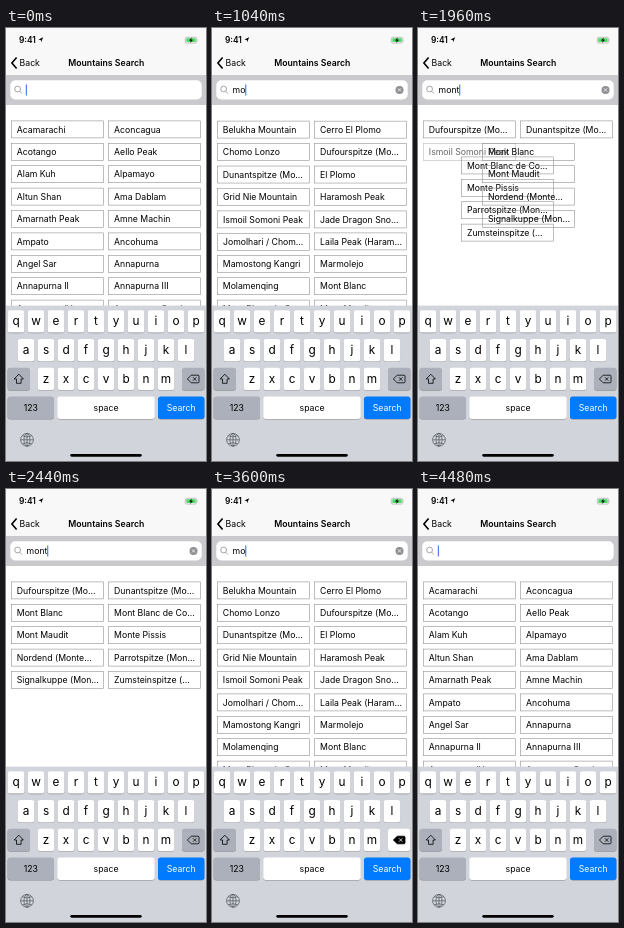
Write an HTML page that moves like this. It is 200 px wide and 433 px high and loops after 4520 ms.

```html
<!DOCTYPE html>
<html lang="en">
<head>
<meta charset="utf-8">
<title>Mountains Search</title>
<style>
html, body { margin: 0; width: 100%; height: 100%; overflow: hidden; background: #fff; }
svg { display: block; width: 100%; height: 100%; }
text { font-family: Inter, Roboto, sans-serif; font-size: 8.7px; fill: #000; }
.mid { text-anchor: middle; }
.letter { font-size: 11.8px; }
.cell rect { fill: none; stroke: #929292; stroke-width: .6; }
</style>
</head>
<body>
<svg id="stage" viewBox="0 0 200 433" preserveAspectRatio="none">
  <g id="cells"></g>

  <rect width="200" height="47" fill="#f8f8f8"/>
  <text x="13" y="15.2" font-weight="600" style="font-size:8.4px">9:41</text>
  <path d="M37.2 9.2 L32.4 11.5 L34.8 11.9 L35.1 14.2 Z"/>
  <rect x="179.3" y="9.3" width="11.4" height="5.8" rx="1.6" fill="none" stroke="#999" stroke-width=".6"/>
  <rect x="180.3" y="10.3" width="9.4" height="3.8" rx=".8" fill="#4cd964"/>
  <path d="M191.5 11.2 q1 1 0 2 Z" fill="#999"/>
  <path d="M185.7 9.4 L183 12.6 H184.8 L184.2 15 L187 11.8 H185.2 Z"/>
  <path d="M10.6 29.6 L5.9 35.1 L10.6 40.6" fill="none" stroke="#000" stroke-width="1.6"/>
  <text x="13.6" y="38.2">Back</text>
  <text x="100.3" y="38.2" class="mid" font-weight="600">Mountains Search</text>

  <rect y="47" width="200" height="30" fill="#c9c9ce"/>
  <rect x="4.3" y="52.3" width="191.4" height="19.2" rx="5" fill="#fff"/>
  <g fill="none" stroke="#8e8e93" stroke-width=".8">
    <circle cx="11.6" cy="61" r="2.9"/>
    <path d="M13.7 63.2 L16 65.6"/>
  </g>
  <text id="query" x="20.6" y="65.1"></text>
  <rect id="caret" y="56.5" width="1.07" height="11" fill="#426bf2"/>
  <g id="clear">
    <circle cx="187.5" cy="61.9" r="4" fill="#8e8e93"/>
    <path d="M185.9 60.3 l3.2 3.2 m0 -3.2 l-3.2 3.2" stroke="#fff" stroke-width=".8"/>
  </g>

  <rect y="277.6" width="200" height="155.4" fill="#d1d4da"/>
  <g id="keys"></g>
  <path d="M12.8 346.2 L17.4 351 H15.1 V355.3 H10.5 V351 H8.2 Z" fill="none" stroke="#000" stroke-width=".8" stroke-linejoin="round"/>
  <g stroke-width=".8" stroke-linejoin="round" stroke="#000">
    <path id="deleteIcon" d="M181.4 351 L185.2 347.2 H192 q1 0 1 1 V353.8 q0 1 -1 1 H185.2 Z"/>
    <path id="deleteCross" d="M187 349.3 l3.4 3.4 m0 -3.4 l-3.4 3.4"/>
  </g>
  <g fill="none" stroke="#50555c" stroke-width=".7">
    <circle cx="21" cy="411.8" r="6.4"/>
    <ellipse cx="21" cy="411.8" rx="3" ry="6.4"/>
    <path d="M21 405.4 V418.2 M14.6 411.8 H27.4 M16.2 407.7 Q21 410.2 25.8 407.7 M16.2 415.9 Q21 413.4 25.8 415.9"/>
  </g>
  <rect x="64.3" y="426" width="71.4" height="2.7" rx="1.35"/>
</svg>
<script>
const LOOP = 4520, MOVE = 300;
const ROW = 22.4, VISIBLE_ROWS = 15;
const byId = id => document.getElementById(id);

function add(parent, tag, attrs, label) {
  const node = document.createElementNS('http://www.w3.org/2000/svg', tag);
  for (const key in attrs) node.setAttribute(key, attrs[key]);
  if (label) node.textContent = label;
  return parent.appendChild(node);
}

// A bar marks where a long label is cut off.
const mountains = [
  ...`Acamarachi,Aconcagua,Acotango,Aello Peak,Alam Kuh,Alpamayo,Altun Shan,Ama Dablam,
Amarnath Peak,Amne Machin,Ampato,Ancohuma,Angel Sar,Annapurna,Annapurna II,Annapurna III,
Annapurna IV,Annapurna South,Api,Ararat,Artesonraju,Ausangate,Babis Mta,Baintha Brakk,
Baltoro Kangri,Bamba Dhura,Bandarpunch,Baruntse,Batura Sar,Belukha Mountain,Bogda Peak,
Broad Peak,Buni Zom,Cayambe,Cerro Bonete,Cerro El Muerto,Cerro El Plomo,Chachakumani,
Chakragil,Chamlang,Changtse,Chimborazo,Cho Oyu,Chomo Lonzo,Damavand,Denali,Dhaulagiri,
Dome Kang,Dufourspitze (Mo|nte Rosa),Dunantspitze (Mo|nte Rosa),El Plomo,Gasherbrum,
Grid Nie Mountain,Gyachung Kang,Haramosh Peak,Himalchuli,Illimani,Ismoil Somoni Peak,
Jade Dragon Sno|w Mountain,Jomolhari / Chom|olhari,K2,Kamet,Laila Peak (Haram|osh Valley),
Lhotse,Makalu,Mamostong Kangri,Manaslu,Marmolejo,Masherbrum,Molamenqing,Mont Blanc,
Mont Blanc de Co|urmayeur,Mont Maudit,Monte Pissis`.replace(/\n/g, '').split(','),
  ...Array.from({ length: 44 }, (_, i) => `Mount ${i + 1}`),
  'Nordend (Monte| Rosa)', 'Parrotspitze (Mon|te Rosa)', 'Pik Moskva',
  'Signalkuppe (Mon|te Rosa)', 'Zumsteinspitze (|Monte Rosa)'
];

const edits = [
  [0, ''], [210, 'm'], [750, 'mo'], [1292, 'mon'], [1830, 'mont'],
  [2520, 'mon'], [3060, 'mo'], [3620, 'm'], [4140, '']
].map(([time, query], i, all) => ({
  time, query,
  deleting: i > 0 && query.length < all[i - 1][1].length,
  places: placesFor(query)
}));

function placesFor(query) {
  const places = new Map();
  for (const name of mountains)
    if (name.replace('|', '').toLowerCase().includes(query)) places.set(name, places.size);
  return places;
}

const cells = mountains.map(name => {
  const [start, rest] = name.split('|');
  const node = add(byId('cells'), 'g', { class: 'cell' });
  add(node, 'rect', { width: 92, height: 17 });
  add(node, 'text', { x: 5.5, y: 11.7 }, rest ? start + '...' : start);
  return { name, node };
});

function addKey(x, row, width, fill, label, cls = 'mid', color = '#000') {
  const y = 282.2 + row * 28.8;
  const shape = { x, width, height: 22.4, rx: 2.7 };
  add(byId('keys'), 'rect', { ...shape, y: y + .55, fill: '#898a8d' });
  const face = add(byId('keys'), 'rect', { ...shape, y, fill });
  const drop = cls === 'mid' ? 14.2 : 15;
  if (label) add(byId('keys'), 'text', { x: x + width / 2, y: y + drop, class: cls, style: `fill:${color}` }, label);
  return face;
}

const GRAY = '#abb0ba';
['qwertyuiop', 'asdfghjkl', 'zxcvbnm'].forEach((letters, row) =>
  [...letters].forEach((letter, i) =>
    addKey([1.6, 11.6, 31.6][row] + i * 20, row, 16.8, '#fff', letter, 'mid letter')));
addKey(1.6, 2, 22.4, GRAY);
const deleteKey = addKey(176, 2, 22.4, GRAY);
addKey(1.6, 3, 46.4, GRAY, '123');
addKey(51.2, 3, 97.6, '#fff', 'space');
addKey(152, 3, 46.4, '#007aff', 'Search', 'mid', '#fff');

function easeInOut(x) {
  let s = x;
  for (let i = 0; i < 6; i++)
    s -= (((.52 * s - .78) * s + 1.26) * s - x) / ((1.56 * s - 1.56) * s + 1.26);
  return s * s * (3 - 2 * s);
}

const mix = (a, b, p) => a + (b - a) * p;
const rowOf = place => Math.floor(place / 2);
const xOf = place => 5.3 + place % 2 * 97.3;
const yOf = place => 92.9 + rowOf(place) * ROW;

function drawCell({ name, node }, before, after, p) {
  let from = before.get(name), to = after.get(name), opacity = 1;
  if (from === undefined) {
    from = to;
    opacity = p;
  } else if (to === undefined) {
    to = from;
    opacity = 1 - p;
  } else if (rowOf(from) > VISIBLE_ROWS) {
    from = to; // cells from far below appear in place
  }
  const y = from === undefined ? Infinity : mix(yOf(from), yOf(to), p);
  const shown = opacity > 0 && y < 290;
  node.setAttribute('display', shown ? 'inline' : 'none');
  if (!shown) return;
  node.setAttribute('transform', `translate(${mix(xOf(from), xOf(to), p)} ${y})`);
  node.setAttribute('opacity', opacity);
}

function render(t) {
  const index = edits.findLastIndex(edit => edit.time <= t);
  const edit = edits[index], previous = edits[Math.max(0, index - 1)];
  const p = easeInOut(Math.min(1, (t - edit.time) / MOVE));
  for (const cell of cells) drawCell(cell, previous.places, edit.places, p);

  const query = byId('query');
  query.textContent = edit.query;
  const width = edit.query ? query.getComputedTextLength() : 0;
  byId('caret').setAttribute('x', 19.8 + width + (width ? .6 : 0));
  byId('clear').setAttribute('display', edit.query ? 'inline' : 'none');

  const pressed = edits.some(e => e.deleting && t >= e.time - 40 && t < e.time + 100);
  deleteKey.setAttribute('fill', pressed ? '#fff' : GRAY);
  byId('deleteIcon').setAttribute('fill', pressed ? '#000' : 'none');
  byId('deleteCross').setAttribute('stroke', pressed ? '#fff' : '#000');
}

function tick() {
  render(performance.now() % LOOP);
  requestAnimationFrame(tick);
}
tick();
</script>
</body>
</html>
```
